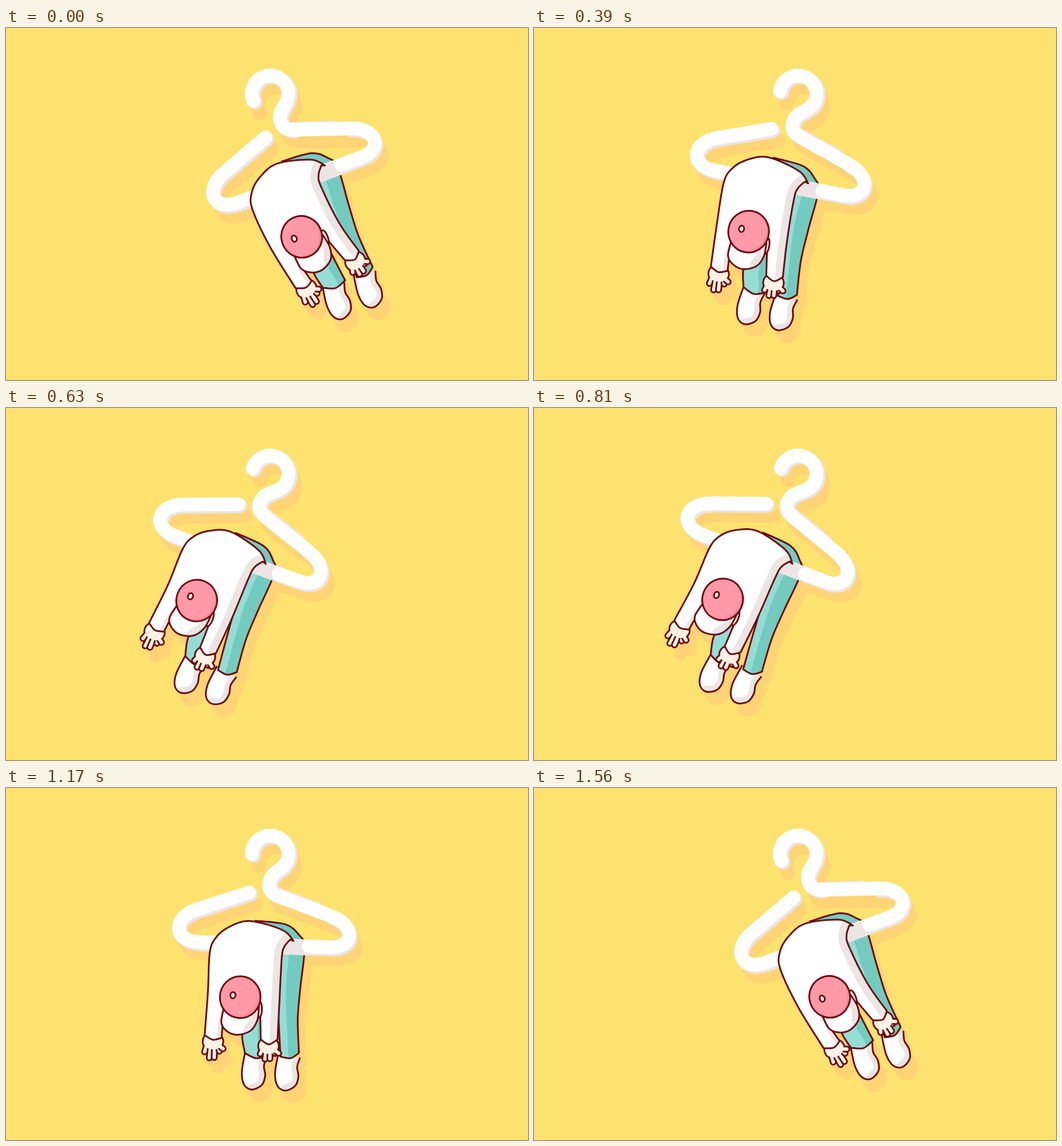
Write an HTML page with a canvas that moves like this. It is 911 px wide and 615 px high and loops after 1.59 s.

```html
<!DOCTYPE html>
<html lang="en">
<head>
<meta charset="utf-8">
<title>Hanging out</title>
<style>
  html, body { margin: 0; width: 100%; height: 100%; overflow: hidden; background: #fee270; }
  canvas { display: block; }
</style>
</head>
<body>
<canvas id="stage" width="911" height="615"></canvas>
<script>
const ctx = document.getElementById('stage').getContext('2d');
const LOOP = 1590, STEP = 30, HALF = 780;
const PIVOT = [461, 115];
const C = {
  bg: '#fee270', shadow: '#ffd474', line: '#6e060c', white: '#ffffff', grey: '#ece5e4',
  teal: '#73cbbf', mint: '#94ddd5', pink: '#ff99a8', rose: '#f48b9b', skin: '#fff2e4'
};

// Everything is drawn around the hook's centre with the hanger level.
const hook = new Path2D();
hook.arc(0, 0, 32, Math.PI * .98, Math.PI * 2.11);
hook.bezierCurveTo(24, 27, 6, 30, 2, 46);
hook.bezierCurveTo(-2, 60, 4, 68, 16, 72.5);
const slope = new Path2D('M16 72.5L85 95');
const lower = new Path2D('M112 104C155 117 155 158 112 158L-118 160C-164 159 -164 118 -122 103L-33 69');
const slopeEnd = new Path2D('M85 95L112 104');
const barShade = new Path2D('M25 160L74 160');
const barEnd = new Path2D('M75 158.5L112 158');

const FOOT = [-19, -2, -23, 32, -18, 54, -4, 62, 13, 53, 18, 36, 15, 20, 19, 4];
const FEET = [[50, 350], [-8, 351]];
const RIGHT_LEG = [
  [-20, 118, 33, 122, 57, 139, 68, 160, 64, 230, 62, 285, 67, 345],
  [67, 345, 53, 355, 35, 353],
  [35, 353, 25, 241, 27, 176]
];
const LEFT_LEG = [
  [-34, 300, -33, 325, -27, 350],
  [-27, 350, -7, 358, 14, 351],
  [14, 351, 9, 315, 4, 275]
];
const BODY = [
  [48, 150, 28, 132, -30, 119, -67, 132, -89, 153, -97, 180, -95, 248, -92, 325],
  [-92, 325, -77, 332, -62, 327],
  [-62, 327, -63, 300, -60, 277],
  [-7, 236, 0, 282, 6, 323],
  [6, 323, 21, 330, 35, 320],
  [35, 320, 31, 259, 29, 183, 32, 162, 42, 148]
];
const BRIM = [-64, 270, -66, 300, -55, 314, -36, 319, -14, 310, -4, 290, -4, 266];

function ease(x1, x2, u) {
  let lo = 0, hi = 1;
  for (let i = 0; i < 30; i++) {
    const s = (lo + hi) / 2;
    const x = 3 * x1 * s * (1 - s) ** 2 + 3 * x2 * s * s * (1 - s) + s ** 3;
    if (x < u) lo = s; else hi = s;
  }
  return lo * lo * (3 - 2 * lo);
}

// The hanger leads; arms and head follow with a softer ease.
function motion(t) {
  const back = t >= HALF;
  const u = Math.min(1, t / HALF - back);
  const swing = back ? 1 - ease(.77, .26, u) : ease(.58, .15, u);
  const follow = back ? 1 - ease(.85, .4, u) : ease(.6, .4, u);
  return { angle: (41 * swing - 19.6) * Math.PI / 180, sway: 20 - 36 * follow };
}

// Bends hanging points sideways, more the lower they are.
const depth = y => Math.max(0, (y - 165) / 160);
const tilt = (y, sway) => sway * depth(y) / 130;
function bend(points, sway) {
  const out = [];
  for (let i = 0; i < points.length; i += 2) {
    const x = points[i], y = points[i + 1];
    out.push(x + sway * depth(y) ** 2, y - (x + 28) * tilt(y, sway));
  }
  return out;
}

// Smooth curves through the points; each run starts with a corner.
function curve(runs, closed) {
  const path = new Path2D();
  runs.forEach((p, n) => {
    const last = p.length / 2 - 1;
    const at = (i, axis) => p[Math.min(last, Math.max(0, i)) * 2 + axis];
    if (n) path.lineTo(p[0], p[1]); else path.moveTo(p[0], p[1]);
    for (let i = 0; i < last; i++) {
      const c1 = [0, 1].map(a => at(i, a) + (at(i + 1, a) - at(i - 1, a)) / 6);
      const c2 = [0, 1].map(a => at(i + 1, a) - (at(i + 2, a) - at(i, a)) / 6);
      path.bezierCurveTo(...c1, ...c2, at(i + 1, 0), at(i + 1, 1));
    }
  });
  if (closed) path.closePath();
  return path;
}

function ellipse(x, y, rx, ry) {
  const path = new Path2D();
  path.ellipse(x, y, rx, ry, 0, 0, Math.PI * 2);
  return path;
}

function stroke(path, color, width) {
  ctx.strokeStyle = color;
  ctx.lineWidth = width;
  ctx.stroke(path);
}

function fill(path, color) {
  ctx.fillStyle = color;
  ctx.fill(path);
}

function shape(path, color, tint, shade) {
  fill(path, tint || color);
  if (shade && !tint) {
    ctx.save();
    ctx.clip(path);
    shade();
    ctx.restore();
  }
  stroke(path, tint || C.line, 3);
}

function placed(x, y, turn, paint) {
  ctx.save();
  ctx.translate(x, y);
  ctx.rotate(turn);
  paint();
  ctx.restore();
}

// A side face, moved by a screen offset whatever the swing.
function side(path, dx, dy, angle) {
  const c = Math.cos(angle), s = Math.sin(angle);
  placed(dx * c + dy * s, dy * c - dx * s, 0, () => stroke(path, C.grey, 24));
}

function drawHanger(angle, tint) {
  const white = tint || C.white;
  if (!tint) {
    side(lower, 3, 4, angle);
    side(hook, 4, 3, angle);
    side(slope, 2, -2, angle);
  }
  stroke(lower, white, 24);
  stroke(barShade, tint || C.grey, 25);
  for (const path of [barEnd, hook, slope, slopeEnd]) stroke(path, white, 24);
}

function drawHand(x, y, reach, sway, tint) {
  const line = tint || C.line, skin = tint || C.skin;
  const palm = new Path2D('M-3 9L3 9');
  placed(...bend([x, y], sway), -.07 - tilt(y, sway), () => {
    stroke(palm, line, 33);
    for (let i = 0; i < 5; i++) {
      const thumb = i === 4;
      const tipY = thumb ? 21 : reach * (.7 + .3 * Math.sin(i * 1.1));
      const finger = new Path2D(`M${thumb ? 8 : -10 + 6.5 * i} 14L${thumb ? 18 : -14 + 8.5 * i} ${tipY}`);
      stroke(finger, line, 12);
      stroke(finger, skin, 6);
    }
    stroke(palm, skin, 27);
  });
}

function drawHead(sway, tint) {
  const [earX, earY] = bend([-3, 272], sway);
  shape(ellipse(earX, earY, 5, 14), C.skin, tint);
  const brim = bend(BRIM, sway);
  shape(curve([brim]), C.white, tint, () => stroke(curve([brim.slice(8)]), C.grey, 24));
  const [x, y] = bend([-38, 253], sway);
  shape(ellipse(x, y, 35.5, 36.5), C.rose, tint, () => fill(ellipse(x - 5, y - 3, 36, 37), C.pink));
  const [bx, by] = bend([-51, 250.5], sway);
  shape(ellipse(bx, by, 4.4, 5.6), C.white, tint);
}

function drawAll({ angle, sway }, tint) {
  for (const [x, y] of FEET) {
    placed(x, y, 0, () => shape(curve([FOOT]), C.white, tint,
      () => stroke(curve([FOOT.slice(6)]), C.grey, 20)));
  }
  shape(curve(RIGHT_LEG), C.teal, tint, () => stroke(curve([RIGHT_LEG[2]]), C.mint, 28));
  shape(curve(LEFT_LEG), C.teal, tint, () => stroke(curve([LEFT_LEG[0]]), C.mint, 54));
  drawHanger(angle, tint);
  drawHand(-77, 326, 39, sway, tint);
  drawHand(20, 324, 33, sway, tint);
  const body = BODY.map(run => bend(run, sway));
  shape(curve(body, true), C.white, tint, () => {
    stroke(curve([body[5]]), C.grey, 28);
    stroke(curve([body[2]]), C.grey, 16);
  });
  drawHead(sway, tint);
}

function frame(now) {
  const pose = motion(Math.floor((now % LOOP) / STEP) * STEP);
  fill(new Path2D('M0 0H911V615H0Z'), C.bg);
  placed(PIVOT[0] + 12, PIVOT[1] + 21, pose.angle, () => drawAll(pose, C.shadow));
  placed(...PIVOT, pose.angle, () => drawAll(pose));
}

ctx.lineCap = ctx.lineJoin = 'round';
let start;
function tick(now) {
  if (start === undefined) start = now;
  frame(Math.max(0, now - start));
  requestAnimationFrame(tick);
}
frame(0);
requestAnimationFrame(tick);
</script>
</body>
</html>
```
